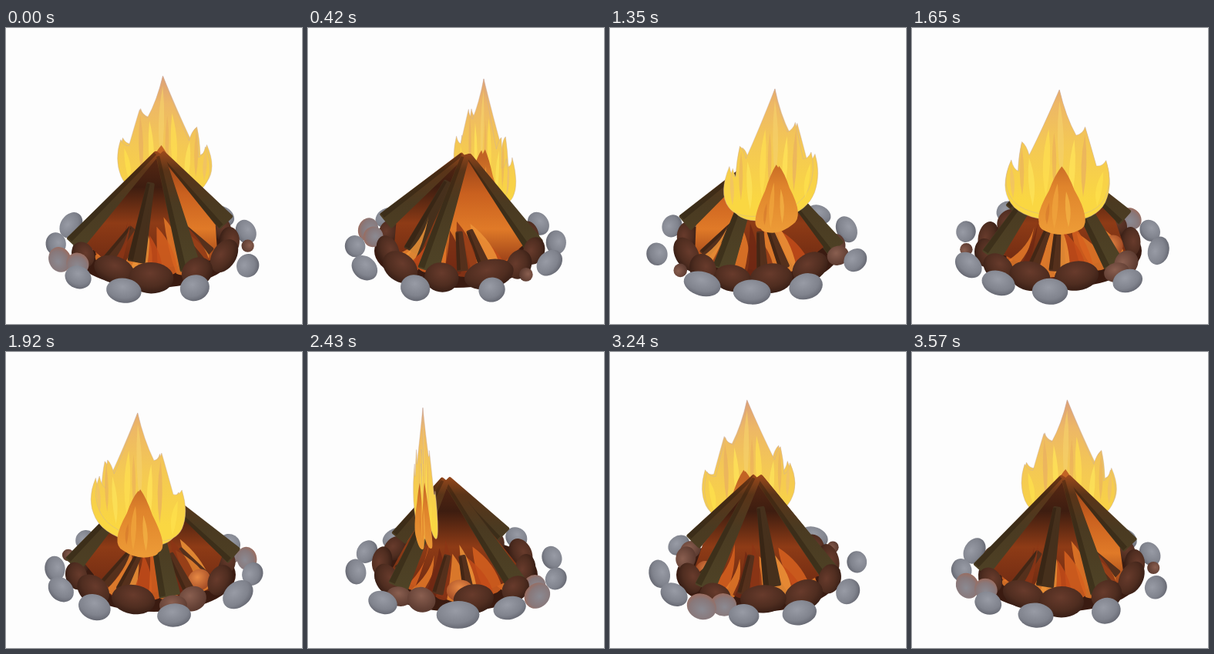
Write an HTML page that moves like this. It is 384x384 px and loops after 3600 ms.

```html
<!DOCTYPE html>
<html lang="en">
<head>
<meta charset="utf-8">
<title>Campfire turntable</title>
<style>
  html, body { margin: 0; width: 100%; height: 100%; overflow: hidden; background: #fdfdfd; }
  svg { display: block; width: 100vw; height: 100vh; }
</style>
</head>
<body>
<svg id="stage" viewBox="0 0 384 384">
  <defs>
    <radialGradient id="grey" cx=".45" cy=".35" r=".7">
      <stop offset="0" stop-color="#989ba5"/><stop offset=".65" stop-color="#80838d"/><stop offset="1" stop-color="#61636d"/>
    </radialGradient>
    <radialGradient id="warm" cx=".55" cy=".6" r=".75">
      <stop offset="0" stop-color="#8b8a92"/><stop offset=".55" stop-color="#88787a"/><stop offset="1" stop-color="#a8644c"/>
    </radialGradient>
    <radialGradient id="brown" cx=".48" cy=".35" r=".7">
      <stop offset="0" stop-color="#683b2c"/><stop offset=".6" stop-color="#4f2d20"/><stop offset="1" stop-color="#331b13"/>
    </radialGradient>
    <radialGradient id="dusk" cx=".45" cy=".35" r=".7">
      <stop offset="0" stop-color="#8a5f50"/><stop offset="1" stop-color="#56362c"/>
    </radialGradient>
    <radialGradient id="ember" cx=".5" cy=".35" r=".7">
      <stop offset="0" stop-color="#e88a45"/><stop offset="1" stop-color="#9c4522"/>
    </radialGradient>
    <linearGradient id="flame" gradientUnits="userSpaceOnUse" x1="0" y1="62" x2="0" y2="225">
      <stop offset="0" stop-color="#dca078"/><stop offset=".22" stop-color="#edb766"/>
      <stop offset=".55" stop-color="#f4c854"/><stop offset="1" stop-color="#fad742"/>
    </linearGradient>
    <linearGradient id="tongue" gradientUnits="userSpaceOnUse" x1="0" y1="168" x2="0" y2="262">
      <stop offset="0" stop-color="#c26424"/><stop offset=".4" stop-color="#df842c"/><stop offset="1" stop-color="#ec9a36"/>
    </linearGradient>
    <linearGradient id="log" gradientUnits="userSpaceOnUse" x1="0" y1="156" x2="0" y2="318">
      <stop offset="0" stop-color="#a54c1c"/><stop offset=".18" stop-color="#5a3418"/>
      <stop offset=".45" stop-color="#4a3a21"/><stop offset="1" stop-color="#4f4427"/>
    </linearGradient>
    <linearGradient id="dark" gradientUnits="userSpaceOnUse" x1="0" y1="160" x2="0" y2="315">
      <stop offset="0" stop-color="#5c2a14"/><stop offset=".3" stop-color="#3d1d10"/>
      <stop offset=".6" stop-color="#8e3b16"/><stop offset="1" stop-color="#6a2812"/>
    </linearGradient>
    <linearGradient id="bright" gradientUnits="userSpaceOnUse" x1="0" y1="160" x2="0" y2="315">
      <stop offset="0" stop-color="#8a3d18"/><stop offset=".35" stop-color="#c9601f"/>
      <stop offset=".65" stop-color="#e07a28"/><stop offset="1" stop-color="#8a3214"/>
    </linearGradient>
  </defs>
  <ellipse cx="192" cy="289" rx="106" ry="48" fill="#3a1b11"/>
  <g id="scene"></g>
</svg>
<script>
const scene = document.getElementById('scene');
const LOOP = 3600, STEP = 30, DIST = 850;
const CX = 192, CY = 289, SIN = 0.44, COS = 0.898;
const TOP = 216;
const rad = d => d * Math.PI / 180;
const items = [];
let spin = 0;

function make(tag, attrs, parent = scene) {
  const el = document.createElementNS('http://www.w3.org/2000/svg', tag);
  for (const k in attrs) el.setAttribute(k, attrs[k]);
  parent.append(el);
  return el;
}

// World: x right, y up, z towards the viewer.
function project(x, y, z) {
  const s = DIST / (DIST - z * COS - y * SIN);
  return { x: CX + x * s, y: CY - (y * COS - z * SIN) * s, s };
}
function polar(r, deg, y) {
  const a = rad(deg + spin);
  return project(r * Math.cos(a), y, r * Math.sin(a));
}
const depth = (r, deg) => r * Math.sin(rad(deg + spin));
const at = p => p.x.toFixed(2) + ' ' + p.y.toFixed(2);
const poly = pts => 'M' + pts.map(at).join('L') + 'Z';

// Points alternate between anchors and control points.
function curve(pts) {
  let d = 'M' + at(pts[0]);
  for (let i = 1; i < pts.length; i += 2)
    d += 'Q' + at(pts[i]) + ' ' + at(pts[(i + 1) % pts.length]);
  return d + 'Z';
}

function stone(deg, r, w, h, fill) {
  const el = make('ellipse', { fill: `url(#${fill})` });
  const thick = Math.min(w, 13);
  items.push({ el, key: () => depth(r, deg), draw() {
    const a = rad(deg + spin), sn = Math.sin(a), cs = Math.cos(a);
    const p = polar(r, deg, 12);
    const xx = (w * sn) ** 2 + (thick * cs) ** 2;
    const yy = SIN * SIN * ((w * cs) ** 2 + (thick * sn) ** 2) + (h * COS) ** 2;
    const xy = SIN * (thick * thick - w * w) * sn * cs;
    const mid = (xx + yy) / 2, gap = Math.hypot((xx - yy) / 2, xy);
    const tilt = Math.atan2(2 * xy, xx - yy) * 90 / Math.PI;
    el.setAttribute('rx', Math.sqrt(mid + gap) * p.s);
    el.setAttribute('ry', Math.sqrt(mid - gap) * p.s);
    el.setAttribute('transform', `translate(${at(p)}) rotate(${tilt.toFixed(2)})`);
  } });
}

function log(deg, r0, y0, w0, r1, y1, w1, fill, sort, apex = 0) {
  const g = make('g', {});
  const body = make('path', { fill, stroke: fill, 'stroke-width': 4, 'stroke-linejoin': 'round' }, g);
  const shade = make('path', { fill: '#22140a', opacity: .35 }, g);
  items.push({ el: g, key: () => depth(sort, deg), draw() {
    const a = rad(deg + spin), b = rad(spin - 57);
    const t = project(r0 * Math.cos(a) + apex * Math.cos(b), y0, r0 * Math.sin(a) + apex * Math.sin(b));
    const f = polar(r1, deg, y1);
    const len = Math.hypot(f.x - t.x, f.y - t.y) || 1;
    const nx = (t.y - f.y) / len, ny = (f.x - t.x) / len;
    const edge = (p, k) => ({ x: p.x + nx * k * p.s, y: p.y + ny * k * p.s });
    body.setAttribute('d', poly([edge(t, -w0), edge(t, w0), edge(f, w1), edge(f, -w1)]));
    shade.setAttribute('d', poly([edge(t, w0 * .3), edge(t, w0 + 1.5), edge(f, w1 + 1.5), edge(f, w1 * .45)]));
  } });
}

// Shadowed wall between two neighbouring logs.
function wall(from, to, fill) {
  const el = make('path', { fill: `url(#${fill})` });
  items.push({ el, key: () => depth(28, (from + to) / 2), draw() {
    el.setAttribute('d', poly([polar(12, -57, 126), polar(88, from, 22), polar(86, (from + to) / 2, 4), polar(88, to, 22)]));
  } });
}

function petal(deg, r, top, wide, fill) {
  const el = make('path', { fill, opacity: .85 });
  items.push({ el, key: () => depth(45, deg), draw() {
    el.setAttribute('d', curve([
      polar(r, deg - wide, 6), polar(r * .8, deg - wide * 1.5, top * .6), polar(38, deg + 8, top),
      polar(r * .6, deg + wide, top * .4), polar(r, deg + wide, 6), polar(r + 5, deg, 2)
    ]));
  } });
}

// Upright sheets: u runs along the tangent, v is height; bulge thickens the base.
function sheet(deg, r, layers, rank) {
  const g = make('g', {});
  const parts = layers.map(([pts, attrs, bulge = 0]) => ({ pts, bulge, el: make('path', attrs, g) }));
  const front = () => depth(r, deg) > 0;
  items.push({ el: g, key: () => front() ? 62 + rank : -62 + rank, draw() {
    const a = rad(deg + spin), sn = Math.sin(a), cs = Math.cos(a);
    for (const { pts, bulge, el } of parts)
      el.setAttribute('d', curve(pts.map(([u, v]) => {
        const d = r + bulge * (1 - v / TOP);
        return project(d * cs - u * sn, v, d * sn + u * cs);
      })));
  } });
}
const leaf = (u, low, high, w, lean = 0) =>
  [[u + lean, high], [u - w, (low + high) / 2], [u, low], [u + w, (low + high) / 2]];

// Outer ring: angle, radius, half width, half height, gradient
[[30, 130, 15, 14, 'grey'], [5, 120, 8, 8, 'dusk'], [345, 127, 23, 14, 'grey'], [318, 129, 21, 14, 'grey'],
 [290, 128, 20, 15, 'grey'], [248, 129, 19, 13, 'grey'], [206, 126, 24, 16, 'grey'], [178, 126, 20, 13, 'grey'],
 [157, 125, 18, 15, 'warm'], [147, 110, 15, 13, 'warm'], [133, 129, 17, 13, 'grey'], [105, 130, 20, 14, 'grey'],
 [69, 128, 17, 15, 'grey'],
 // Inner ring
 [24, 95, 31, 18, 'brown'], [357, 98, 18, 18, 'brown'], [332, 101, 22, 16, 'brown'], [306, 98, 25, 18, 'brown'],
 [273, 93, 26, 18, 'brown'], [231, 99, 17, 15, 'dusk'], [246, 106, 16, 11, 'dusk'], [194, 91, 24, 18, 'brown'],
 [158, 95, 20, 15, 'brown'], [122, 89, 27, 17, 'brown'], [92, 96, 26, 19, 'brown'], [58, 96, 20, 18, 'brown'],
 [203, 68, 16, 13, 'ember']].forEach(s => stone(...s));

// Glowing heart
const feet = [66, 163, 248, 338];
feet.forEach((d, i) => wall(d, i < 3 ? feet[i + 1] : feet[0] + 360, i < 3 ? 'dark' : 'bright'));
const glow = ['#c44c19', '#e67a28', '#8c3516', '#ee9338', '#d8611f', '#702913', '#ea842e'];
for (let i = 0; i < 28; i++)
  petal(i * 360 / 28, 72 + i * 5 % 9, 36 + i * 17 % 29, 6 + i * 3 % 5, glow[i * 3 % 7]);

[20, 42, 140, 195, 224, 290, 311].forEach(d => log(d, 36, 42, 2.5, 74, 11, 5, '#55301c', 50));
log(110, 12, 96, 3, 62, 15, 9, '#46301c', 49);
feet.forEach(d => log(d, 3, 126, 3.5, 103, 24, 10.5, 'url(#log)', 60, 12));

const outline = [[0, TOP], [-7, 186], [-19, 164], [-27, 166], [-29, 174], [-34, 158], [-43, 127], [-50, 126],
  [-54, 134], [-63, 108], [-54, 86], [-44, 64], [-10, 62], [44, 62], [57, 84], [70, 104],
  [56, 134], [54, 122], [48, 120], [47, 140], [43, 156], [38, 152], [35, 140], [19, 172]];
const tongue = [[0, 128], [-8, 118], [-15, 98], [-38, 56], [-20, 50], [0, 40], [20, 50], [38, 56], [15, 98], [8, 118]];
const tint = (fill, opacity) => ({ fill, opacity });
const rim = { fill: 'url(#flame)', stroke: '#c9aaa4', 'stroke-width': .8, 'stroke-opacity': .5 };

sheet(-74, 38.6, [
  [outline, rim, 11],
  [outline, rim, -11],
  [leaf(-2, 110, 204, 7, 2), tint('#f6d06a', .7)],
  [leaf(-14, 84, 160, 7, -3), tint('#ffe458', .75)],
  [leaf(16, 90, 172, 8, -4), tint('#ffe050', .7)],
  [leaf(-28, 90, 166, 6, -1), tint('#e8ac62', .65)],
  [leaf(6, 100, 168, 5), tint('#e9a95c', .55)],
  [leaf(32, 78, 138, 7, 3), tint('#fce35a', .75)],
  [leaf(44, 92, 150, 5, -1), tint('#eab05e', .65)],
  [leaf(-45, 78, 122, 7, -6), tint('#fde04c', .75)],
  [leaf(55, 88, 128, 5, 1), tint('#eebc70', .6)]
], 0);
sheet(-78, 42, [
  [tongue, { fill: 'url(#tongue)' }, 7],
  [tongue, { fill: 'url(#tongue)' }, -7],
  [leaf(-8, 52, 98, 6, 3), tint('#f3b044', .8)],
  [leaf(9, 50, 108, 7, -4), tint('#f0a53c', .75)],
  [leaf(18, 56, 84, 4, -3), tint('#d0702a', .5)]
], .5);

function draw(now) {
  const t = Math.floor(now % LOOP / STEP) * STEP;
  spin = t * 360 / LOOP;
  for (const it of items) { it.z = it.key(); it.draw(); }
  const order = items.slice().sort((a, b) => a.z - b.z);
  scene.append(...order.map(it => it.el));
}
function tick(now) {
  draw(now);
  requestAnimationFrame(tick);
}
draw(0);
requestAnimationFrame(tick);
</script>
</body>
</html>
```
